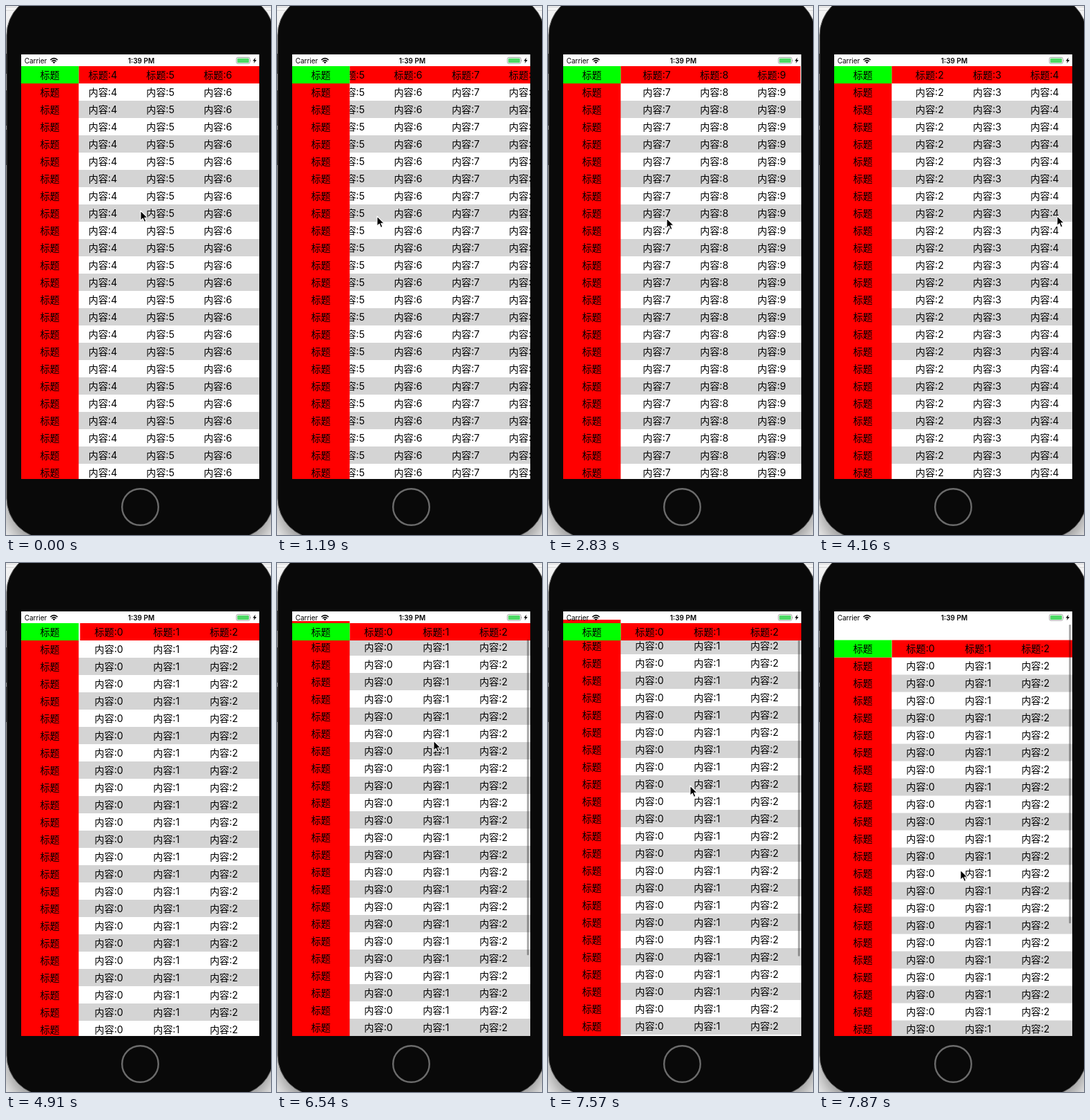
Recreate the animation shown at these times as an HTML page. Size 384 px wide and 765 px high, loop 8 s.

```html
<!DOCTYPE html>
<html lang="zh-CN">
<head>
<meta charset="utf-8">
<style>
  html, body { margin: 0; width: 100%; height: 100%; overflow: hidden; background: #f3f3f3; }
  svg { display: block; width: 384px; height: 765px; }
  text { font: 14.17px Inter, "Noto Sans CJK SC", "Noto Sans CJK", sans-serif; text-anchor: middle; }
  .status text { font-size: 10px; }
</style>
</head>
<body>
<svg viewBox="0 0 384 765">
  <defs>
    <clipPath id="screen"><rect x="22" y="70" width="345" height="614"/></clipPath>
    <clipPath id="pane"><rect x="105.33" y="-400" width="261.67" height="2000"/></clipPath>
    <filter id="blur" x="-20%" y="-20%" width="140%" height="140%"><feGaussianBlur stdDeviation="14"/></filter>
  </defs>

  <rect width="384" height="765" fill="#f3f3f3"/>
  <path d="M0 1.5H384M0 6.5H384" stroke="#d8d8d8"/>
  <rect x="1" y="20" width="387" height="764" rx="58" fill="#000" opacity=".42" filter="url(#blur)"/>
  <path d="M.5 69V98M.5 122V173M.5 179V230" stroke="#111" stroke-width="2"/>
  <rect x="1" y="-16" width="387" height="786" rx="58" fill="#090909" stroke="#5c5c5c"/>
  <circle cx="194.5" cy="724.5" r="26.3" fill="#090909" stroke="#6b6b6b" stroke-width="2.4"/>

  <g clip-path="url(#screen)">
    <rect x="22" y="70" width="345" height="614" fill="#fff"/>
    <g id="body">
      <g id="stripes" fill="#d4d4d4"></g>
      <g clip-path="url(#pane)"><g id="cells"></g></g>
      <rect x="22" y="112" width="83.33" height="750" fill="#f00"/>
      <g id="side"></g>
    </g>
    <g id="head">
      <g clip-path="url(#pane)">
        <g id="titles"><rect x="105.33" y="87" width="833.33" height="25" fill="#f00"/></g>
      </g>
      <rect x="22" y="87" width="83.33" height="25" fill="#0f0"/>
      <text x="63.6" y="104.9">标题</text>
    </g>
    <rect id="thumb" x="362.3" width="2.6" rx="1.3" opacity=".36"/>
    <g class="status">
      <text x="43" y="82.7">Carrier</text>
      <g fill="none" stroke="#000" stroke-width="1.7">
        <path d="M64.3 78Q69.5 73.2 74.7 78M66.3 80.1Q69.5 77.2 72.7 80.1"/>
      </g>
      <path d="M67.6 81.2Q69.5 79.7 71.4 81.2L69.5 83.2Z"/>
      <text x="196" y="82.7" font-weight="600" style="font-weight:600">1:39 PM</text>
      <rect x="333.9" y="74.4" width="19.4" height="8.8" rx="2" fill="none" stroke="#8d8d8d" stroke-width=".8"/>
      <rect x="335.2" y="75.7" width="16.8" height="6.2" rx="1" fill="#4cd964"/>
      <path d="M354.3 77.4Q355.8 78.8 354.3 80.2Z" fill="#8d8d8d"/>
      <path d="M361.6 74.6L357.6 79.5H360L359 83L363 78H360.6Z"/>
    </g>
  </g>
  <path id="cursor" d="M0 0V14.3L3.3 11.2L5.5 16.4L8 15.3L5.8 10.3H10.3Z" stroke="#fff" stroke-width="1.1" stroke-linejoin="round"/>
</svg>
<script>
const LOOP = 8000, STEPS = 54;
const ROWS = 30, COLS = 10, COL_W = 83.333, ROW_H = 25;
const TRACK = 593, VIEW = 597, CONTENT = ROW_H * (ROWS + 1), MAX_Y = CONTENT - VIEW;
const $ = id => document.getElementById(id);

function add(parent, tag, attrs, label) {
  const el = document.createElementNS("http://www.w3.org/2000/svg", tag);
  for (const key in attrs) el.setAttribute(key, attrs[key]);
  if (label) el.textContent = label;
  parent.append(el);
}

const colX = c => 147 + c * COL_W;
for (let c = 0; c < COLS; c++) add($("titles"), "text", { x: colX(c), y: 104.9 }, "标题:" + c);
for (let r = 0; r < ROWS; r++) {
  const top = 112 + r * ROW_H, y = top + 17.9;
  if (r % 2) add($("stripes"), "rect", { x: 22, y: top, width: 345, height: ROW_H });
  add($("side"), "text", { x: 63.6, y }, "标题");
  for (let c = 0; c < COLS; c++) add($("cells"), "text", { x: colX(c), y }, "内容:" + c);
}

// Each key is [step, value, ...]; steps in between are linear.
const scrollX = [
  [0, 340], [1, 370], [3, 444], [7, 444], [8, 457], [9, 474], [11, 474],
  [14, 500], [16, 586], [17, 590], [18, 577], [19, 572.8], [20, 571.8], [22, 571.8],
  [23, 550], [26, 340], [29, 60], [30, 8], [31, -28], [32, -9], [33, -2], [34, -0.6], [35, 0]
];
const scrollY = [
  [43, 0], [44, 28], [45, 105], [46, 175], [47, 215], [48, 222.5],
  [49, 195], [50, 120], [51, 30], [52, -14], [53, -24.5]
];
const pointer = [
  [0, 195, 296], [1, 165, 298], [3, 91, 303], [4, 91, 303], [7, 158, 303], [8, 145, 304],
  [9, 128, 305], [11, 128, 305], [13, 210, 300], [16, 112, 305], [19, 172, 307], [22, 172, 307],
  [26, 290, 305], [30, 400, 302], [34, 400, 302], [35, 330, 298], [37, 250, 290],
  [43, 228, 285], [44, 227, 257], [45, 224, 180], [46, 218, 100], [47, 212, 54],
  [48, 212, -40], [49, 207, 200], [53, 205, 444]
];

function at(keys, n, k = 1) {
  const i = keys.findIndex(key => key[0] >= n);
  if (i < 0) return keys[keys.length - 1][k];
  if (i === 0) return keys[0][k];
  const a = keys[i - 1], b = keys[i];
  return a[k] + (b[k] - a[k]) * (n - a[0]) / (b[0] - a[0]);
}

const move = (id, x, y) => $(id).setAttribute("transform", `translate(${x} ${y})`);

function draw(n) {
  const sx = at(scrollX, n), sy = at(scrollY, n);
  move("cells", -sx, 0);
  move("titles", -sx, 0);
  move("body", 0, -sy);
  move("head", 0, Math.max(0, -sy));
  move("cursor", at(pointer, n, 1), at(pointer, n, 2));

  const below = Math.max(0, sy - MAX_Y), above = Math.max(0, -sy);
  const inside = Math.min(MAX_Y, Math.max(0, sy));
  const thumb = $("thumb");
  thumb.setAttribute("y", 89 + TRACK * inside / CONTENT + below);
  thumb.setAttribute("height", TRACK * VIEW / CONTENT - below - above);
  thumb.setAttribute("visibility", n > 43 ? "visible" : "hidden");
}

// The screen refreshes in even steps, so the pose is held within each one.
const start = performance.now();
let last = -1;
function tick(now) {
  const n = Math.floor(Math.max(0, now - start) % LOOP * STEPS / LOOP);
  if (n !== last) draw(last = n);
  requestAnimationFrame(tick);
}
draw(0);
requestAnimationFrame(tick);
</script>
</body>
</html>
```
